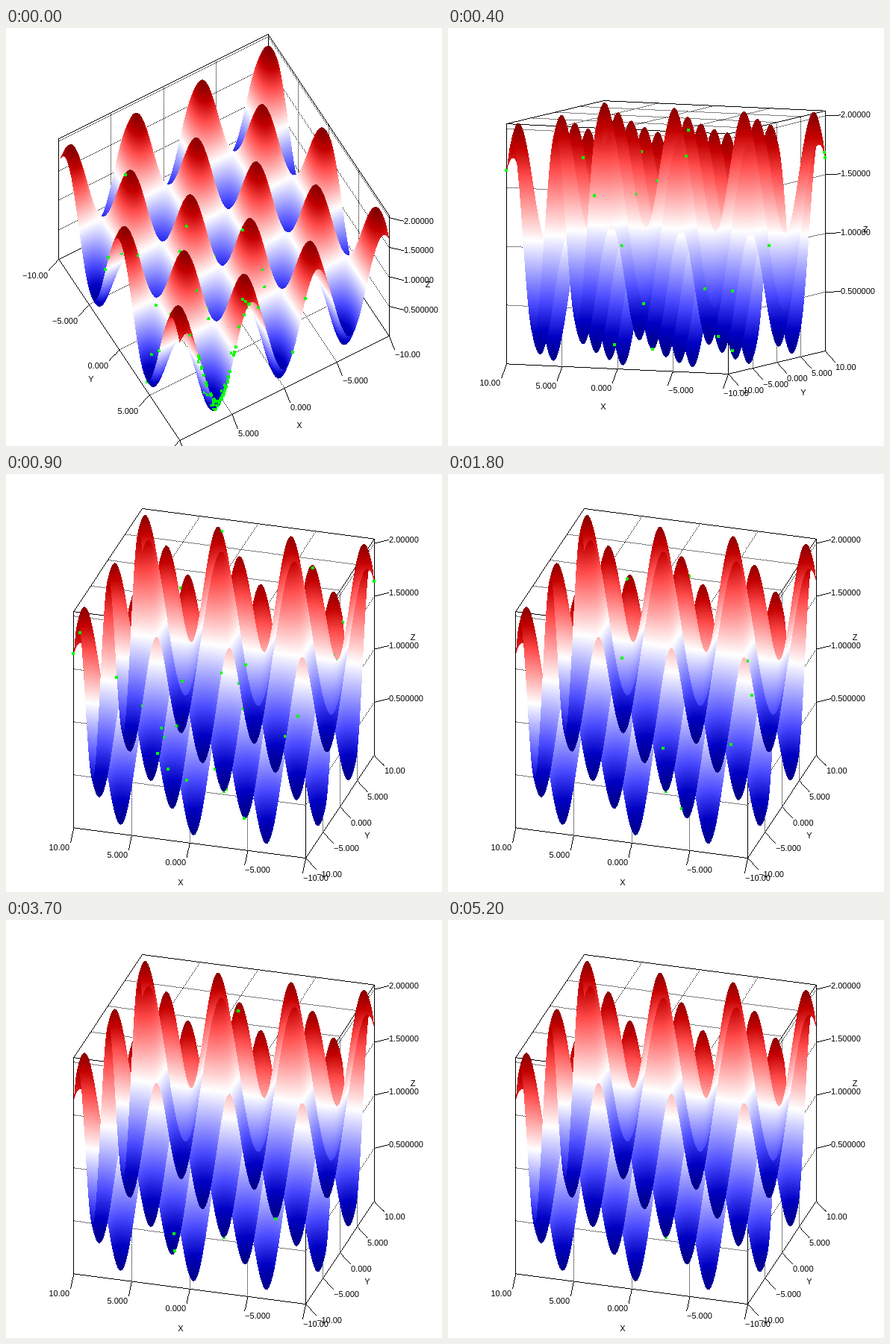
Recreate the animation shown at these times as an HTML page with a canvas. Size 584 by 561 pixels, loop 5300 ms.

```html
<!DOCTYPE html>
<html lang="en">
<head>
<meta charset="utf-8">
<title>Swarm on a wavy surface</title>
<style>
  html, body { margin: 0; width: 100%; height: 100%; overflow: hidden; background: #fff; }
  canvas { display: block; }
</style>
</head>
<body>
<canvas id="stage" width="584" height="561"></canvas>
<script>
const W = 584, H = 561, LOOP = 5300, STEP = 100, LAST = LOOP / STEP - 1, TURN = 7;
const SIZE = 324, CX = 291.5, CY = 280.5, TOP = 2.042, GRID = 160;
const ctx = document.getElementById('stage').getContext('2d');

const clamp = (v, lo, hi) => Math.max(lo, Math.min(hi, v));
const height = (x, y) => 1 + (x * x + y * y) / 4000 - Math.cos(x) * Math.cos(y / Math.SQRT2);

// keys are [place, ...values], joined by straight lines
function along(keys, p) {
  let i = 1;
  while (i < keys.length - 1 && p > keys[i][0]) i++;
  const [p0, ...a] = keys[i - 1], [p1, ...b] = keys[i];
  const u = clamp((p - p0) / (p1 - p0), 0, 1);
  return a.map((v, j) => v + (b[j] - v) * u);
}

// step, azimuth, elevation
const VIEW = [[0, 30, 60], [2, 26.8, 26], [4, 23.6, -6], [6, 16.8, -25], [TURN, 16.4, -26.4]];

// distance from mid height, weak channel, strong channel
const RAMP = [[0, 255, 255], [0.27, 75, 255], [0.39, 0, 195], [0.5, 0, 128]];
const palette = Uint32Array.from({ length: 512 }, (_, i) => {
  const t = i / 511 - 0.5;
  const [weak, strong] = along(RAMP, Math.abs(t)).map(Math.round);
  const [r, b] = t > 0 ? [strong, weak] : [weak, strong];
  return (255 << 24 | b << 16 | weak << 8 | r) >>> 0;
});

function random(seed) {
  let s = seed * 7919 + 17 | 0;
  return () => {
    s = s + 0x6D2B79F5 | 0;
    let t = Math.imul(s ^ s >>> 15, 1 | s);
    t = t + Math.imul(t ^ t >>> 7, 61 | t) ^ t;
    return ((t ^ t >>> 14) >>> 0) / 4294967296;
  };
}

// orthographic: screen x, screen y, nearness, relative height
function camera(az, el) {
  const a = az * Math.PI / 180, e = el * Math.PI / 180;
  const ca = Math.cos(a), sa = Math.sin(a), ce = Math.cos(e), se = Math.sin(e);
  return (x, y, z) => {
    const X = x / 20, Y = y / 20, Z = z / TOP - 0.5, deep = sa * X + ca * Y;
    return [CX + SIZE * (sa * Y - ca * X), CY + SIZE * (deep * se - Z * ce), deep * ce + Z * se, z / TOP];
  };
}

function drawLine(pix, p, q, dotted) {
  const dx = q[0] - p[0], dy = q[1] - p[1];
  const n = Math.max(1, Math.round(Math.max(Math.abs(dx), Math.abs(dy))));
  for (let i = 0; i <= n; i += dotted ? 2 : 1) {
    const x = Math.round(p[0] + dx * i / n), y = Math.round(p[1] + dy * i / n);
    if (x >= 0 && x < W && y >= 0 && y < H) pix[y * W + x] = 0xff000000;
  }
}

function fillTriangle(pix, depth, a, b, c) {
  const area = (b[0] - a[0]) * (c[1] - a[1]) - (b[1] - a[1]) * (c[0] - a[0]);
  if (Math.abs(area) < 1e-6) return;
  const x0 = Math.ceil(Math.min(a[0], b[0], c[0])), x1 = Math.floor(Math.max(a[0], b[0], c[0]));
  const y0 = Math.ceil(Math.min(a[1], b[1], c[1])), y1 = Math.floor(Math.max(a[1], b[1], c[1]));
  for (let y = y0; y <= y1; y++) for (let x = x0; x <= x1; x++) {
    const u = ((x - a[0]) * (c[1] - a[1]) - (y - a[1]) * (c[0] - a[0])) / area;
    const v = ((b[0] - a[0]) * (y - a[1]) - (b[1] - a[1]) * (x - a[0])) / area;
    if (u < -1e-6 || v < -1e-6 || u + v > 1.000001) continue;
    const mix = k => a[k] + u * (b[k] - a[k]) + v * (c[k] - a[k]);
    const i = y * W + x;
    depth[i] = mix(2);
    pix[i] = palette[clamp(Math.round(mix(3) * 511), 0, 511)];
  }
}

function buildScene(step) {
  const [az, el] = along(VIEW, step), project = camera(az, el);
  const base = el > 0 ? 0 : TOP, rim = el > 0 ? 10 : -10;
  const img = new ImageData(W, H), pix = new Uint32Array(img.data.buffer).fill(0xffffffff);
  const depth = new Float32Array(W * H).fill(-9);
  const labels = [];
  const line = (p, q, dotted) => drawLine(pix, project(...p), project(...q), dotted);
  const marks = [-10, -5, 0, 5, 10], levels = [0.5, 1, 1.5, 2];

  // back walls with the floor or ceiling
  for (const v of marks) {
    const dotted = Math.abs(v) < 10;
    line([v, -10, 0], [v, -10, TOP], dotted);
    line([-10, v, 0], [-10, v, TOP], dotted);
    line([v, -10, base], [v, 10, base], dotted);
    line([-10, v, base], [10, v, base], dotted);
  }
  for (const z of [0, ...levels, TOP]) {
    const dotted = z > 0 && z < TOP;
    line([-10, -10, z], [10, -10, z], dotted);
    line([-10, -10, z], [-10, 10, z], dotted);
  }

  // ticks point away from the box centre
  function axis(name, at, mid, values, digits, drop) {
    const m = project(...at(mid)), len = Math.hypot(m[0] - CX, m[1] - CY);
    const ux = (m[0] - CX) / len, uy = (m[1] - CY) / len;
    for (const v of values) {
      const p = project(...at(v)), end = [p[0] + ux * 20, p[1] + uy * 20];
      drawLine(pix, p, end);
      const left = end[0] < CX;
      labels.push({
        text: v.toPrecision(digits).replace('-', '\u2212'),
        x: end[0] + (left ? -1 : 1), y: end[1] + drop, align: left ? 'right' : 'left'
      });
    }
    labels.push({ text: name, x: m[0] + ux * 54, y: m[1] + uy * 54, align: 'center' });
  }
  axis('X', v => [v, rim, 0], 0, marks, 4, 7);
  axis('Y', v => [rim, v, 0], 0, marks, 4, 7);
  axis('Z', v => [-10, 10, v], TOP / 2, levels, 6, 0);

  // cells run from far to near
  const coord = i => -10 + 20 * i / GRID;
  const row = j => Array.from({ length: GRID + 1 }, (_, i) =>
    project(coord(i), coord(j), height(coord(i), coord(j))));
  let far = row(0);
  for (let j = 1; j <= GRID; j++) {
    const near = row(j);
    for (let i = 0; i < GRID; i++) {
      fillTriangle(pix, depth, far[i], far[i + 1], near[i]);
      fillTriangle(pix, depth, far[i + 1], near[i + 1], near[i]);
    }
    far = near;
  }
  return { img, depth, project, labels };
}

const scenes = Array.from({ length: TURN + 1 }, (_, step) => buildScene(step));

function drawSwarm({ project, depth }, step) {
  const rnd = random(step + 1);
  const bell = () => (rnd() + rnd() + rnd() + rnd() - 2) * 1.73;

  // a square on the surface, cut where nearer parts hide it
  function place(px, py) {
    const x = clamp(px, -10, 10), y = clamp(py, -10, 10);
    const [sx, sy, near] = project(x, y, height(x, y));
    const left = Math.round(sx) - 2, top = Math.round(sy) - 2;
    for (let j = top; j < top + 4; j++) for (let i = left; i < left + 4; i++) {
      if (near > depth[j * W + i] - 0.008) ctx.fillRect(i, j, 1, 1);
    }
  }
  function cloud(count, x, y, sx, sy) {
    for (let i = 0; i < count; i++) place(x + sx * bell(), y + sy * bell());
  }

  ctx.fillStyle = '#0f0';
  if (step === 0) {
    // gathered on the near edge, around a side valley
    cloud(36, 2 * Math.PI, 10, 0.5, 0.3);
    cloud(36, 2 * Math.PI, 10, 1.8, 0.3);
    cloud(34, 5, 5, 4, 4);
    return;
  }
  if (step < 18) {
    place(10, -10);
    place(-10, 10);
  }
  // thins out and closes in on the lowest point
  const calm = Math.exp(-Math.max(0, step - 9) / 11);
  if (step < LAST) cloud(Math.round(8 + 48 * calm), 0, 0, 3 + 2.8 * calm, 3 + 2.8 * calm);
  if (step >= TURN) {
    const [x, y] = project(0, 0, 0);
    ctx.fillRect(Math.round(x) - 2, Math.round(y), 4, 2);
  }
}

function draw(step) {
  const scene = scenes[Math.min(step, TURN)];
  ctx.putImageData(scene.img, 0, 0);
  ctx.fillStyle = '#000';
  ctx.font = '11px "Liberation Sans", Arial, sans-serif';
  for (const { text, x, y, align } of scene.labels) {
    ctx.textAlign = align;
    ctx.fillText(text, Math.round(x), Math.round(y) + 4);
  }
  drawSwarm(scene, step);
}

let shown = -1;
const start = performance.now();
function tick() {
  const step = Math.floor((performance.now() - start) % LOOP / STEP);
  if (step !== shown) draw(shown = step);
  requestAnimationFrame(tick);
}
tick();
</script>
</body>
</html>
```
